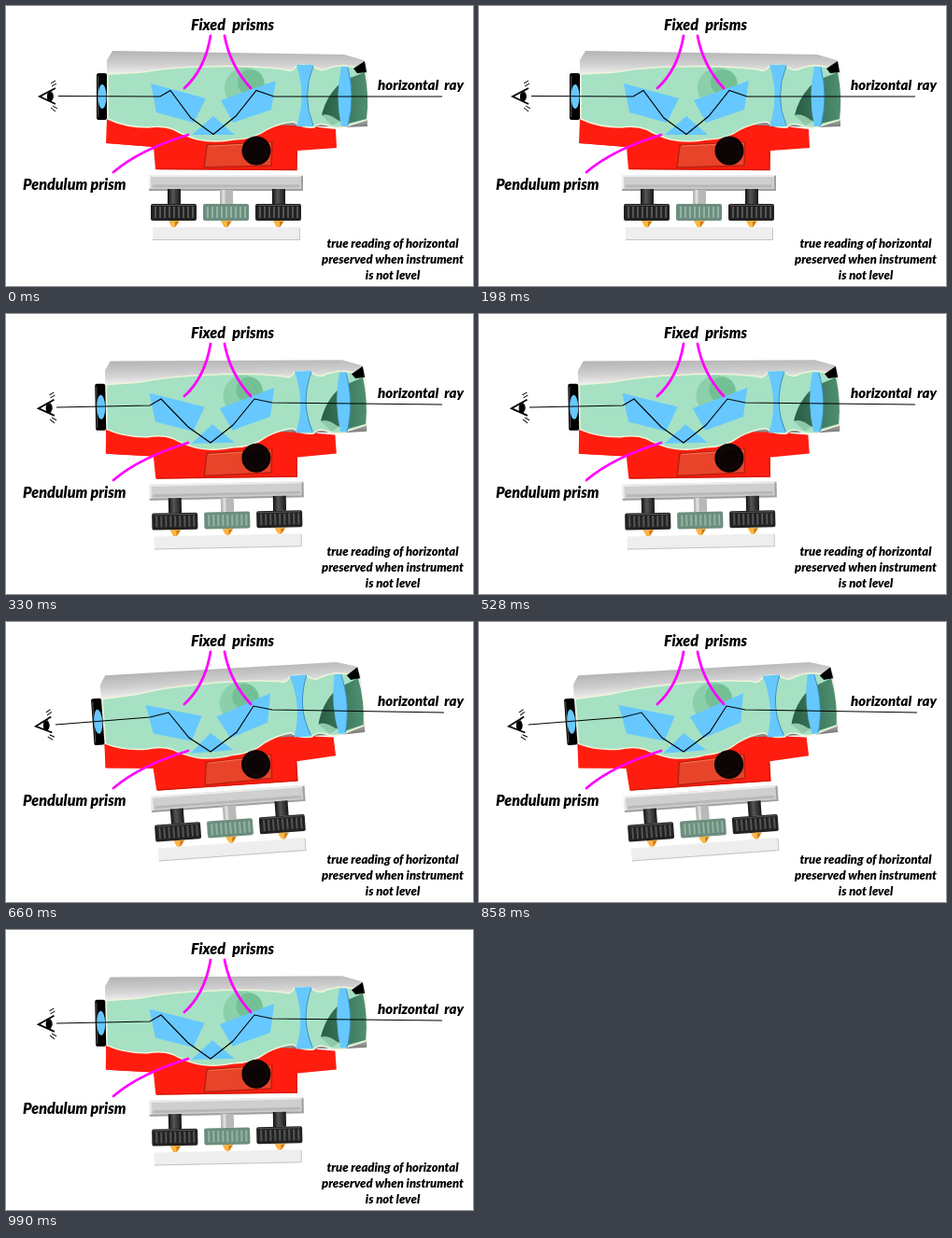
An HTML page for the animation above (1.32 s loop, 500 by 300 pixels).

```html
<!DOCTYPE html>
<html lang="en">
<head>
<meta charset="utf-8">
<title>Automatic level</title>
<style>
  html, body { margin: 0; width: 100%; height: 100%; overflow: hidden; background: #fff; }
  svg { display: block; width: 500px; height: 300px; }
  text { font: italic 900 16px Lato, "Open Sans", sans-serif; }
  .note { font-size: 13px; text-anchor: middle; }
  .glass { fill: #66c8ff; }
  .arrow { fill: none; stroke: #f0f; stroke-width: 2.8; stroke-linecap: round; }
</style>
</head>
<body>
<svg viewBox="0 0 500 300">
  <defs>
    <linearGradient id="tube" x2="0" y2="1">
      <stop offset="0" stop-color="#b4b4b4"/>
      <stop offset=".17" stop-color="#cecece"/>
      <stop offset=".3" stop-color="#ededed"/>
      <stop offset=".8" stop-color="#ddd"/>
      <stop offset="1" stop-color="#777"/>
    </linearGradient>
    <linearGradient id="shade">
      <stop offset="0" stop-color="#285c45"/>
      <stop offset="1" stop-color="#4f8f71"/>
    </linearGradient>
    <linearGradient id="stem">
      <stop offset="0" stop-color="#111"/>
      <stop offset=".4" stop-color="#555"/>
      <stop offset="1" stop-color="#181818"/>
    </linearGradient>
    <g id="tip">
      <path d="M-6 230H6L2 236 0 238-3 236Z" fill="#ffb545"/>
      <path d="M1 231H5L1 237Z" fill="#c87818"/>
    </g>
    <g id="screw">
      <use href="#tip"/>
      <path d="M-7 196H7V212H-7Z" fill="url(#stem)"/>
      <rect x="-25" y="212" width="49" height="18" rx="2" fill="#222"/>
      <path d="M-21 221H22" stroke="#555" stroke-width="12" stroke-dasharray="2 3"/>
      <path d="M-23 213.5H22" stroke="#555"/>
    </g>
  </defs>

  <g id="level">
    <!-- eye -->
    <g fill="none" stroke="#000">
      <path d="M53 88 36 97 53 105" stroke-width="1.8"/>
      <path d="M48 91Q53 97 48 102"/>
      <path d="M49 86 54 83M48 83 53 80M50 107 55 110M48 109 53 113"/>
      <ellipse cx="47" cy="97" rx="2.6" ry="4.5" fill="#000"/>
    </g>

    <!-- housing -->
    <path d="M108 121 107 147 158 151 160 175 311 176 312 155 354 152 353 132 335 130 300 118Z" fill="#ff1d10"/>
    <path d="M161 174.5 311 175.5V156" fill="none" stroke="#d81808" stroke-width="1.5"/>
    <path d="M215 149 285 146 284 171 212 173Z" fill="#e8442a" stroke="#b82010" stroke-width="1.5"/>
    <path d="M217 150 283 147" stroke="#ff7050"/>
    <path d="M114 48 362 52 383 58 387 68V129L362 130 108 121V58Z" fill="url(#tube)"/>

    <!-- cutaway -->
    <path d="M158 124 108 121V147L158 151Z" fill="#ff1d10"/>
    <path d="M109 73Q130 72 145 71 180 65 215 65 260 63 299 68 306 72 311 64 320 62 330 65 337 71 344 67 355 63 365 64 379 66 384 71 389 96 386 122L370 127Q355 133 345 128 335 124 330 130 316 131 308 124 295 125 280 132 265 143 244 143 224 147 205 143 191 139 179 132 168 128 152 130 128 130 109 121Z"
      fill="#a6e1c4" stroke="#eef4d8" stroke-width="1.5"/>
    <path d="M338 117Q343 95 361 80L384 71Q389 96 386 121L366 126Z" fill="url(#shade)"/>
    <path d="M338 117Q346 114 357 124L349 128Z" fill="#8fc9aa"/>
    <path d="M384 59 372 67 376 72 386 71Z"/>
    <circle cx="256" cy="88" r="22" fill="#8bd0ab"/>
    <circle cx="262" cy="82" r="14" fill="#74c095"/>

    <!-- optics -->
    <g class="glass">
      <path d="M155 83 214 99 201 125 161 114Z" />
      <path d="M289 80 230 101 243 125 284 111Z"/>
      <path d="M222 118 245 138H199Z"/>
      <path d="M311 63H329Q316 97 329 129H311Q322 97 311 63Z"/>
      <path d="M359 65H366Q374 97 366 129H359Q352 97 359 65Z"/>
    </g>
    <path d="M366 66Q374 97 366 128M329 64Q316 97 329 128" fill="none" stroke="#3c91c4"/>
    <rect x="97" y="72" width="11" height="50" rx="2"/>
    <path d="M98.5 75V119" stroke="#555"/>
    <ellipse class="glass" cx="103" cy="97" rx="4.5" ry="13"/>
    <circle cx="268" cy="155" r="15.5" fill="#0c0404"/>
    <circle cx="268" cy="155" r="11" fill="none" stroke="#301c1c" stroke-dasharray="1 2"/>

    <!-- base -->
    <rect x="153" y="181" width="165" height="17" fill="#cfcfcf"/>
    <path d="M154 197V182H317" fill="none" stroke="#eee" stroke-width="2"/>
    <path d="M153 197H317V182" fill="none" stroke="#a0a0a0" stroke-width="2"/>
    <path d="M157 193H314" stroke="#b8b8b8" stroke-width="3"/>
    <use href="#tip" x="236"/>
    <path d="M229 197H243V212H229Z" fill="#b8b8b8"/>
    <path d="M233 197V212" stroke="#ddd" stroke-width="3"/>
    <rect x="211" y="212" width="49" height="18" rx="2" fill="#6c8e7e"/>
    <path d="M215 221H258" stroke="#94b4a3" stroke-width="12" stroke-dasharray="2 3"/>
    <use href="#screw" x="180"/>
    <use href="#screw" x="292"/>
    <rect x="157" y="237" width="158" height="14" fill="#eee"/>
    <path d="M157 250.5H314.5V238" fill="none" stroke="#c4c4c4"/>
  </g>

  <polyline id="ray" fill="none" stroke="#000" stroke-width="1.1"/>

  <g class="arrow">
    <path d="M219 32Q213 68 191 88"/>
    <path d="M234 32Q240 64 262 88"/>
    <path d="M115 178Q143 154 195 138"/>
  </g>
  <text x="198" y="26" word-spacing="4">Fixed prisms</text>
  <text x="398" y="90" style="font-size:15px" word-spacing="3">horizontal ray</text>
  <text x="18" y="197">Pendulum prism</text>
  <text class="note" x="414" y="259">true reading of horizontal</text>
  <text class="note" x="414" y="276">preserved when instrument</text>
  <text class="note" x="414" y="293">is not level</text>
</svg>
<script>
  const level = document.getElementById("level");
  const ray = document.getElementById("ray");
  const flat = { tilt: 0, ray: "56,96.5 165,97 176,90.5 198,120 222,137.5 246,118 268,90.5 287,97 467,97" };
  const slight = { tilt: -1.2, ray: "54,100 154,98 166,91 195,121 219,138 243,119 266,91 285,95 467,97" };
  const steep = { tilt: -4.2, ray: "53,110 154,102 174,97 196,124 219,139 247,118 265,90 285,94 469,97" };
  const poses = [flat, slight, steep, slight];

  function draw() {
    const pose = poses[Math.floor(performance.now() / 330) % poses.length];
    level.setAttribute("transform", `rotate(${pose.tilt} 235 160)`);
    ray.setAttribute("points", pose.ray);
    requestAnimationFrame(draw);
  }
  draw();
</script>
</body>
</html>
```
